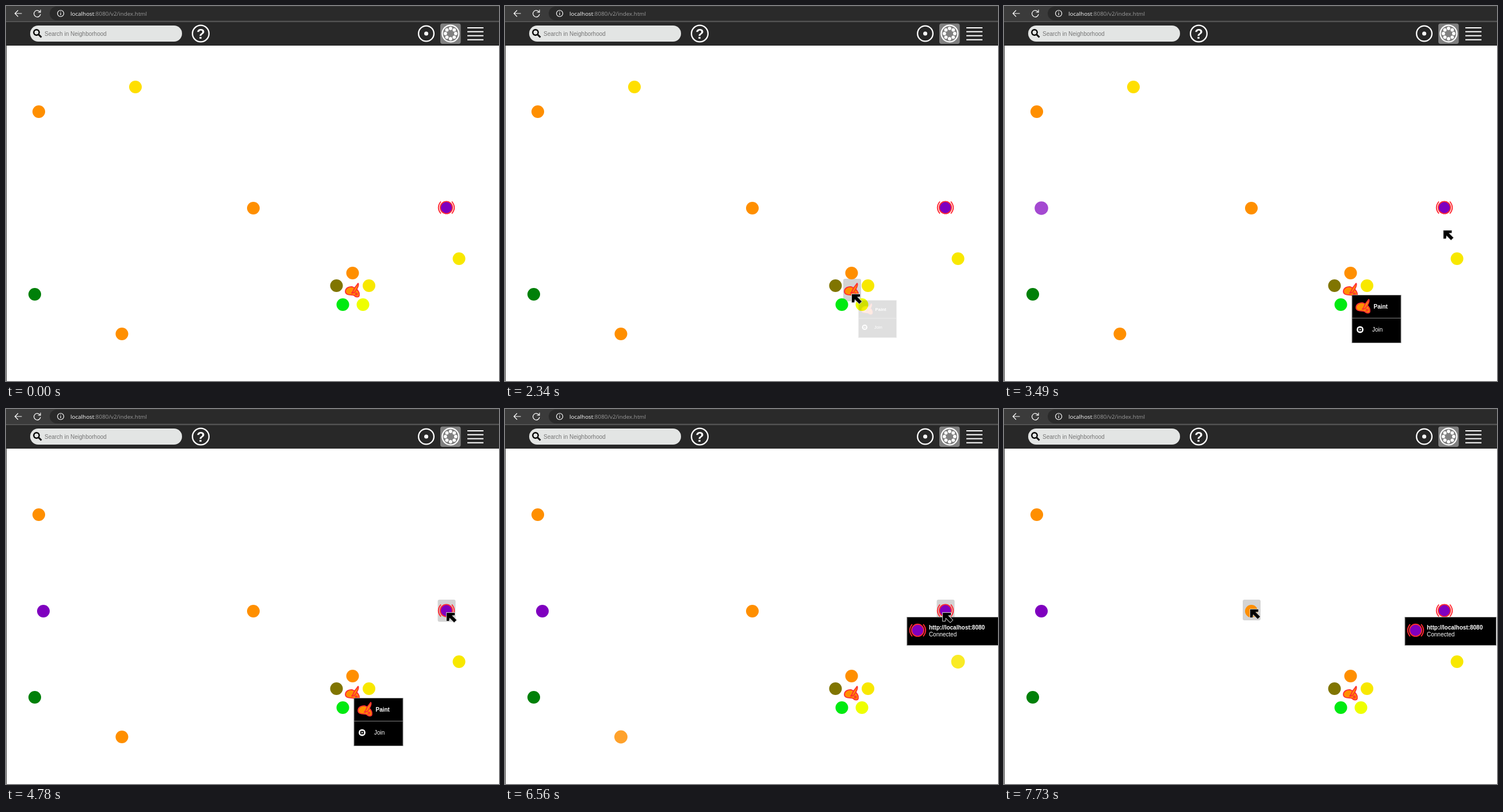
An HTML page that plays this animation: 857 by 653 pixels, repeating every 8 s.

```html
<!DOCTYPE html>
<html lang="en">
<head>
<meta charset="utf-8">
<title>Neighborhood</title>
<style>
  html, body { margin: 0; width: 100%; height: 100%; overflow: hidden; background: #fff; }
  svg { display: block; width: 857px; height: 653px; font: 10px "Liberation Sans", Arial, sans-serif; }
  .line { fill: none; stroke: #fff; }
  .popup { fill: #000; stroke: #808080; }
  .label { fill: #fff; }
  .bold { font-weight: bold; }
</style>
</head>
<body>
<svg viewBox="0 0 857 653">
  <defs>
    <g id="paint" fill="#ff8f00" stroke="#ff2b34" stroke-width="1.8" stroke-linejoin="round">
      <path d="M-12 2C-12-4-5-7 0-6C7-4 13 2 12 9C11 13 6 12 3 9C0 7-12 10-12 2Z"/>
      <path d="M10-12C12-10 9-3 6 1C4 5 1 5-1 5C2 2 2-1 4-4Z"/>
      <circle cx="7" cy="6.5" r="1.6"/>
    </g>
    <g id="server" stroke="#ff2b34" stroke-width="1.9">
      <circle r="10.6" fill="#7f00bf"/>
      <path fill="none" d="M-9.5-10.5Q-18 0-9.5 10.5M9.5-10.5Q18 0 9.5 10.5"/>
    </g>
  </defs>

  <rect width="857" height="653" fill="#fff"/>
  <rect width="857" height="28" fill="#3b3b3b"/>
  <rect x="76" y="1" width="800" height="24" rx="12" fill="#2a2a2a"/>
  <rect y="26.5" width="857" height="1.5" fill="#5c5c5c"/>
  <rect y="28" width="857" height="41" fill="#282828"/>
  <rect y="69" width="1" height="584" fill="#333"/>

  <g class="line" stroke-width="1.2">
    <path d="M27.5 13H16M21 7.5L15.5 13L21 18.5"/>
    <path d="M59.5 11A5.7 5.7 0 1 0 60 14M60 6.5V11H55.5"/>
    <circle cx="95" cy="13" r="5.5"/>
    <path d="M95 12V16M95 9.5V10.8"/>
  </g>
  <text x="112" y="17" fill="#9a9a9a" style="font:9.85px 'Open Sans',sans-serif"><tspan fill="#fff">localhost</tspan>:8080/v2/index.html</text>

  <rect x="42" y="34" width="264" height="28" rx="14" fill="#e3e5e4"/>
  <g fill="none" stroke="#000" stroke-width="2.4">
    <circle cx="53" cy="46" r="4.7"/>
    <path d="M56.5 49.5L61.5 54.5" stroke-width="3"/>
  </g>
  <text x="67" y="51.5" fill="#757575">Search in Neighborhood</text>

  <circle class="line" cx="338.5" cy="48" r="14.4" stroke-width="2.3"/>
  <text class="label bold" x="338.5" y="56.5" text-anchor="middle" font-size="24">?</text>
  <circle class="line" cx="730.5" cy="48" r="13.4" stroke-width="2.3"/>
  <circle cx="730.5" cy="48" r="3.5" fill="#fff"/>
  <rect x="755" y="30.5" width="35.5" height="35.5" rx="4" fill="#808080"/>
  <circle class="line" cx="772.8" cy="48" r="14.4" stroke-width="2.2"/>
  <g id="ring" fill="#fff"></g>
  <path class="line" stroke-width="2" d="M802 38H830M802 44.7H830M802 51.7H830M802 58.7H830"/>

  <g id="highlights" fill="#d3d3d3"></g>
  <g id="people"></g>
  <use href="#paint" x="602" y="495"/>
  <use href="#server" x="765.5" y="351"/>

  <g id="paintPopup">
    <rect class="popup" x="605" y="503.5" width="85" height="83"/>
    <path class="popup" d="M605 543.5H690"/>
    <use href="#paint" x="624" y="523"/>
    <text class="label bold" x="642.5" y="527">Paint</text>
    <circle cx="619" cy="563.5" r="6" fill="#fff"/>
    <rect x="616" y="560.5" width="6" height="6" rx="1"/>
    <path d="M618 561.7L621 563.5L618 565.3Z" fill="#fff"/>
    <text class="label" x="640" y="567">Join</text>
  </g>
  <g id="serverPopup">
    <rect class="popup" x="697" y="362.5" width="158.5" height="49"/>
    <use href="#server" x="715.5" y="385.3"/>
    <text class="label bold" x="735" y="384">http://localhost:8080</text>
    <text class="label" x="735" y="396">Connected</text>
  </g>
  <path id="cursor" stroke="#d0d0d0" stroke-width="1.8" paint-order="stroke"
        d="M0 0H14V4L9 4.5L17 12.5L13 16.5L5 8.5L4 14H0Z"/>
</svg>
<script>
const LOOP = 8000;
const $ = id => document.getElementById(id);
const clamp = v => Math.max(0, Math.min(1, v));
const progress = (t, from, to) => clamp((t - from) / (to - from));
const ease = p => (1 - Math.cos(Math.PI * p)) / 2;

function add(parent, tag, attrs) {
  const node = document.createElementNS('http://www.w3.org/2000/svg', tag);
  for (const key in attrs) node.setAttribute(key, attrs[key]);
  return parent.appendChild(node);
}

for (let i = 0; i < 8; i++) {
  const a = i * Math.PI / 4;
  add($('ring'), 'circle', { cx: 772.8 + 9 * Math.cos(a), cy: 48 + 9 * Math.sin(a), r: 2.9 });
}

// Each person is a plain disc; enter, leave and pulse hold [start, end] times.
const people = [
  { x: 225, y: 141, fill: '#ffdf00', leave: [4380, 4720] },
  { x: 57, y: 184, fill: '#ff8f00' },
  { x: 430, y: 352, fill: '#ff8f00' },
  { x: 787.5, y: 440, fill: '#f8e800', pulse: [6420, 6700] },
  { x: 50, y: 502, fill: '#008009' },
  { x: 201.5, y: 571, fill: '#ff8f00', leave: [6490, 6900] },
  { x: 65, y: 352, fill: '#7f00bf', enter: [3220, 3600] },
  { x: 602.5, y: 465, fill: '#ff8f00' },
  { x: 574.5, y: 487, fill: '#807500' },
  { x: 631, y: 487, fill: '#f8e800' },
  { x: 585.5, y: 520, fill: '#00ea11' },
  { x: 620.5, y: 520, fill: '#eeff00' }
];
for (const p of people) p.node = add($('people'), 'circle', { r: 11, cx: p.x, cy: p.y, fill: p.fill });

const highlights = [
  { x: 588, y: 475, height: 39, on: 1130, off: 3150 },
  { x: 750.5, y: 332, height: 38.5, on: 3700, off: 6840 },
  { x: 415, y: 332, height: 36, on: 7450, off: LOOP }
];
for (const h of highlights) {
  h.node = add($('highlights'), 'rect', { x: h.x, y: h.y, width: 31, height: h.height, rx: 3 });
}

// time, x, y of the pointer tip
const path = [
  [310, 730, 580], [600, 690, 556], [1060, 614, 510], [1610, 603, 502], [3150, 603, 502],
  [3220, 649, 590], [3350, 700, 470], [3490, 764, 391], [3630, 777, 383], [3910, 767, 357],
  [4050, 766, 355], [5520, 766, 355], [5590, 764.5, 355.5], [5730, 761, 355], [6770, 761, 355],
  [7050, 640, 349], [7300, 500, 350], [7520, 433, 351], [7730, 428, 349], [LOOP, 428, 349]
];

function pointerAt(t) {
  const i = path.findIndex(k => k[0] > t);
  if (i < 1) return null;
  const [a, b] = [path[i - 1], path[i]];
  const p = progress(t, a[0], b[0]);
  return [a[1] + (b[1] - a[1]) * p, a[2] + (b[2] - a[2]) * p];
}

function showPopup(node, amount, cx, cy, dx = 0) {
  const s = 0.75 + 0.25 * amount;
  node.setAttribute('opacity', amount);
  node.setAttribute('transform', `translate(${cx + dx} ${cy}) scale(${s}) translate(${-cx} ${-cy})`);
}

function draw(t) {
  for (const p of people) {
    const seen = (p.enter ? progress(t, ...p.enter) : 1) * (p.leave ? 1 - progress(t, ...p.leave) : 1);
    const pulse = p.pulse ? Math.sin(Math.PI * progress(t, ...p.pulse)) : 0;
    p.node.setAttribute('opacity', seen * (1 - 0.15 * pulse));
    p.node.setAttribute('r', 11 * (1 + 0.08 * Math.max(pulse, Math.min(1, 3 * (1 - seen)))));
  }
  for (const h of highlights) h.node.style.display = t >= h.on && t < h.off ? '' : 'none';

  showPopup($('paintPopup'), progress(t, 2305, 2600) * (1 - progress(t, 5050, 5330)), 647.5, 545);
  const slide = 24 * (1 - ease(progress(t, 5930, 6700)));
  showPopup($('serverPopup'), progress(t, 5050, 5330), 776, 387, slide);

  const tip = pointerAt(t);
  $('cursor').style.display = tip ? '' : 'none';
  if (tip) $('cursor').setAttribute('transform', `translate(${tip})`);
}

const start = performance.now();
function frame(now) {
  draw(Math.max(0, now - start) % LOOP);
  requestAnimationFrame(frame);
}
draw(0);
requestAnimationFrame(frame);
</script>
</body>
</html>
```
